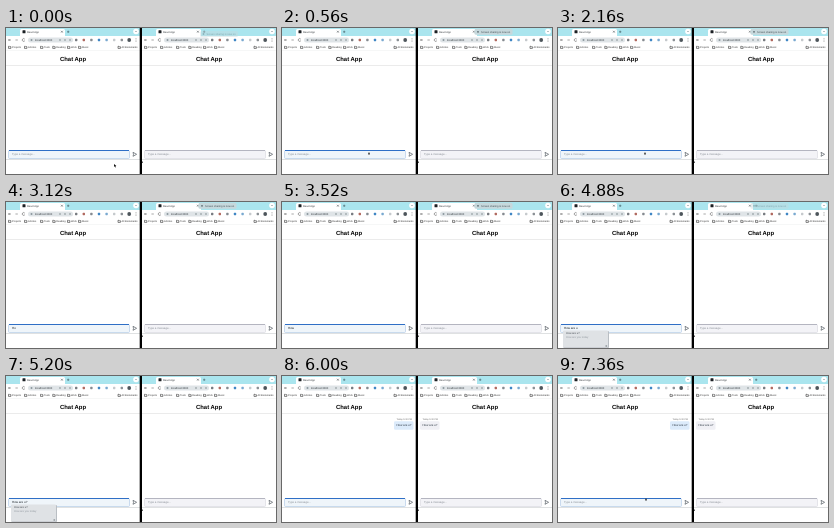
These frames come from a looping animation (270x146 px, 8 s). An HTML page:

```html
<!DOCTYPE html>
<html lang="en">
<head>
<meta charset="utf-8">
<title>Chat App</title>
<style>
html, body { margin: 0; width: 100%; height: 100%; overflow: hidden; background: #fff; }
svg { display: block; width: 100vw; height: 100vh; font-family: "Liberation Sans", Arial, sans-serif; }
text { text-rendering: geometricPrecision; }
</style>
</head>
<body>
<svg id="stage" viewBox="0 0 270 146"></svg>
<script>
const LOOP = 8000, STEP = 80;
const MESSAGE = 'How are u?', HINT = 'Type a message...';
const stage = document.getElementById('stage');

const rect = (x, y, w, h, fill, more = '') =>
  `<rect x="${x}" y="${y}" width="${w}" height="${h}" fill="${fill}" ${more}/>`;
const dot = (x, y, r, fill) => `<circle cx="${x}" cy="${y}" r="${r}" fill="${fill}"/>`;
const text = (x, y, size, fill, str, more = '') =>
  `<text x="${x}" y="${y}" font-size="${size}" fill="${fill}" xml:space="preserve" ${more}>${str}</text>`;
const line = (d, color, w = 0.5) =>
  `<path d="${d}" fill="none" stroke="${color}" stroke-width="${w}"/>`;

function tabs() {
  return rect(0, 0, 134, 8, '#aae5ee') +
    rect(14, 1, 45, 8, '#fff', 'rx="1.5"') +
    rect(16.5, 2.3, 3, 3, '#1c2024', 'rx=".5"') +
    text(21, 4.9, 2.6, '#2c3236', 'React App') +
    line('M55 2.8l1.8 1.8m0-1.8l-1.8 1.8', '#30383c') +
    line('M61 3.8h2.4m-1.2-1.2v2.4', '#34484e') +
    dot(130, 3.5, 2.8, '#fff') +
    line('M129.2 3.2l.8.8.8-.8', '#50656c');
}

function toolbar() {
  const colors = ['#777b80', '#b0695f', '#858a90', '#3f86c4', '#79a9d0', '#c5c9cc', '#8b9095'];
  return rect(0, 8, 134, 8.5, '#fff') +
    line('M5 12H2.5m1-1l-1 1 1 1', '#444') +
    line('M9 12h2.5m-1-1l1 1-1 1', '#999') +
    line('M18.8 11.2a1.4 1.4 0 1 0 .1 1.4', '#444') +
    rect(22, 9.5, 45, 5, '#dfe4e7', 'rx="2.5"') +
    dot(25.5, 12, 1, '#8a979d') +
    text(29, 13, 2.7, '#2b3338', 'localhost:3000') +
    [54, 59, 64].map(x => dot(x, 12, 0.7, '#69757b')).join('') +
    colors.map((c, i) => rect(69 + 7.6 * i, 10.8, 2.4, 2.4, c, 'rx=".6"')).join('') +
    dot(123.2, 12, 1.9, '#4d555b') +
    [10.7, 12, 13.3].map(y => dot(130, y, 0.4, '#444')).join('');
}

function bookmarks() {
  const mark = (x, s) => line(`M${x} 18.3h1l.4.4h1v1.7h-2.4z`, '#333', 0.6) +
    text(x + 3.5, 20.3, 2.5, '#333', s);
  let x = 2.5;
  return ['Projects', 'Articles', 'Tools', 'Reading', 'Work', 'Music'].map(s => {
    const item = mark(x, s);
    x += 6 + s.length * 1.25;
    return item;
  }).join('') + mark(112, 'All Bookmarks') + rect(0, 22.3, 134, 0.5, '#eceeef');
}

function pane(id, x, focus) {
  const [fill, edge, side] = focus ? ['#eff5fa', '#2f6fc6', '#a9c4e4'] : ['#f3f3f7', '#b4b5c0', '#d5d6de'];
  const bx = focus ? 112 : 2;
  return `<g transform="translate(${x})">` + rect(0, 0, 134, 146, '#fff') +
    tabs() + toolbar() + bookmarks() +
    text(67, 33.1, 5.9, '#000', 'Chat App', 'font-weight="700" text-anchor="middle"') +
    rect(0, 37, 134, 0.6, '#dedede') +
    `<g id="msg${id}">` +
    text(bx + 2.5, 44, 2.3, '#666', 'Today 5:30 PM') +
    rect(bx, 45.3, 19.5, 8.5, focus ? '#dcebfb' : '#f0f0f5', 'rx="1.3"') +
    text(bx + 2.5, 50.4, 2.9, '#24303c', MESSAGE) + '</g>' +
    rect(2.5, 122.5, 121, 8, fill, `rx="1" stroke="${side}" stroke-width=".6"`) +
    rect(3, 122, 120, 1, edge) +
    text(6, 127.4, 2.8, '#858b92', HINT, `id="in${id}"`) +
    line('M127 124.3l3.6 2-3.6 2 .5-2z', '#555c63', 0.7) +
    rect(0, 131, 134, 0.7, '#d2d4d6') + '</g>';
}

function suggestions() {
  return rect(5.3, 129, 45.7, 17, '#b9bec3', 'rx="1"') +
    rect(5, 128.5, 45, 17, '#dfe2e5', 'rx="1"') +
    text(8, 132.4, 2.7, '#3e464d', MESSAGE) +
    text(8, 136, 2.7, '#92999f', 'How are you today') +
    rect(47.5, 143.4, 1.6, 1.2, '#7d858c');
}

stage.innerHTML = pane('A', 0, true) + pane('B', 136, false) +
  rect(133.7, 0, 2.3, 146, '#000') + rect(136, 133.5, 0.8, 1.5, '#333') +
  `<g id="tip">${rect(0, 0, 38, 6, '#c6d8dc', 'rx="1.5"')}` +
  dot(3.5, 3, 0.9, '#5d6b71') + text(6.5, 4, 2.6, '#3b474c', 'Screen sharing is now on') + '</g>' +
  `<g id="wide">${suggestions()}</g>` +
  `<g id="small">${rect(5, 128.5, 24, 17, '#dfe2e5', 'rx="1"')}${text(8, 132.4, 2.7, '#3e464d', 'How')}</g>` +
  '<path id="arrow" d="M0 0v3l.8-.7.6 1.2.6-.3-.6-1.1h1z" fill="#111"/>' +
  `<g id="beam">${line('M-1-.8h2m-1 0v1.8', '#222', 0.8)}</g>`;

const [msgA, msgB, input, tip, wide, small, arrow, beam] =
  ['msgA', 'msgB', 'inA', 'tip', 'wide', 'small', 'arrow', 'beam'].map(id => document.getElementById(id));

const keyTimes = [2800, 3040, 3360, 4080, 4320, 4400, 4480, 4560, 4640, 5200];
const SENT = 6000;

const within = (t, a, b) => t >= a && t < b;
const progress = (t, a, b) => Math.min(1, Math.max(0, (t - a) / (b - a)));
const easeOut = (p, power) => 1 - (1 - p) ** power;
const mix = (a, b, p) => a + (b - a) * p;
const show = (node, on) => node.setAttribute('visibility', on ? 'visible' : 'hidden');
const move = (node, x, y) => node.setAttribute('transform', `translate(${x} ${y})`);

function drawInput(t) {
  const count = t < SENT ? keyTimes.filter(k => k <= t).length : 0;
  input.textContent = count ? MESSAGE.slice(0, count) : HINT;
  input.setAttribute('fill', count ? '#10161b' : '#858b92');
  input.setAttribute('font-size', count ? 3 : 2.8);
  show(small, within(t, 3440, 3520) || within(t, 3760, 4000));
  show(wide, within(t, 4880, 5440));
  show(msgA, t >= SENT);
  show(msgB, t >= SENT);
}

function drawPointer(t) {
  const first = t < keyTimes[0];
  const p = first ? progress(t, 0, 560) : progress(t, 6880, 7360);
  const x = first ? mix(108, 87, easeOut(p, 4)) : mix(95, 88, p);
  const y = first ? mix(136, 126, p * p) : mix(126, 124, easeOut(p, 2));
  const visible = first || t >= 6880;
  const inBox = y < 131;
  show(arrow, visible && !inBox);
  show(beam, visible && inBox);
  move(inBox ? beam : arrow, x, y);
}

function drawTip(t) {
  const p = easeOut(progress(t, 0, 560), 2);
  show(tip, t < 4960);
  move(tip, mix(194, 192.5, p), mix(3, 0.8, p));
  tip.setAttribute('opacity', t < 4880 ? mix(0.4, 1, p) : 0.4);
}

function draw(now) {
  const t = Math.floor((now % LOOP) / STEP) * STEP;
  drawInput(t);
  drawPointer(t);
  drawTip(t);
}

const begin = performance.now();
function tick() {
  draw(performance.now() - begin);
  requestAnimationFrame(tick);
}
draw(0);
requestAnimationFrame(tick);
</script>
</body>
</html>
```
